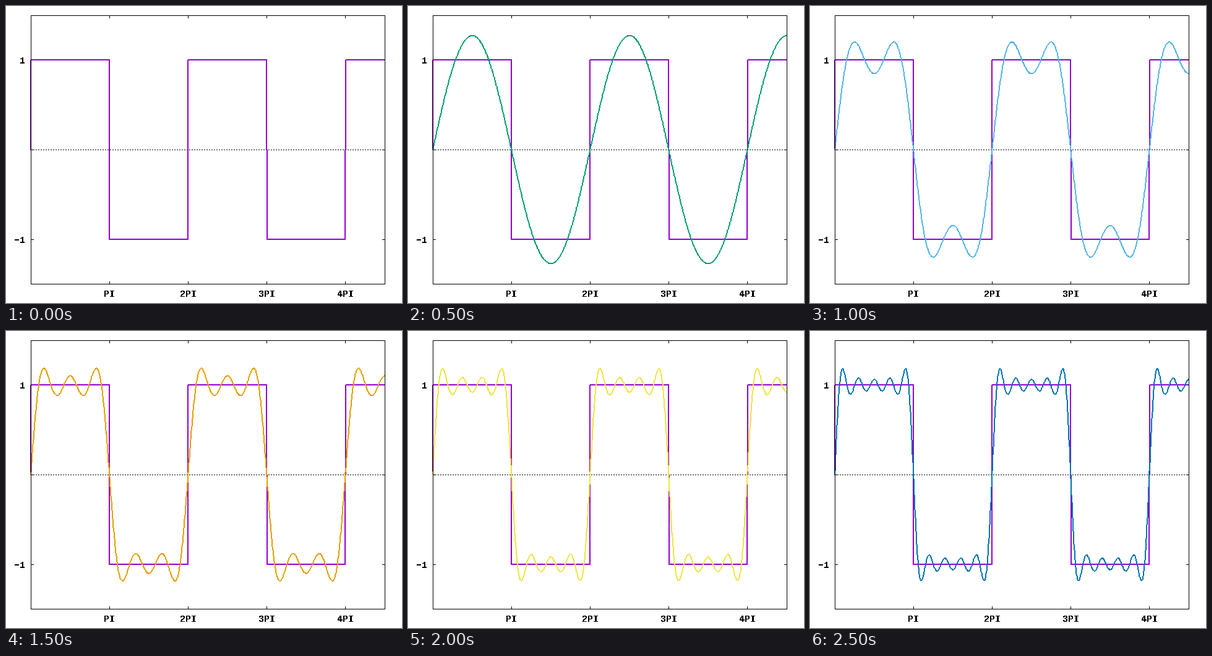
These frames come from a looping animation (640x480 px, 3 s). A matplotlib script:

```python
import numpy as np
import matplotlib.pyplot as plt
from matplotlib.animation import FuncAnimation
from matplotlib.colors import to_rgb

DPI = 80
WIDTH, HEIGHT = 640, 480
LEFT, RIGHT, TOP, BOTTOM = 40, 612, 15, 449
MID = (TOP + BOTTOM) // 2
X_UNIT = (RIGHT - LEFT) / (4.5 * np.pi)
Y_UNIT = (BOTTOM - TOP) / 3
TICK = 5
CHAR = 9  # text cell width
COLORS = ["#009e73", "#56b4e9", "#e69f00", "#f0e442", "#0072b2"]

plt.rcParams["text.antialiased"] = False

fig = plt.figure(figsize=(WIDTH / DPI, HEIGHT / DPI), dpi=DPI,
                 facecolor="white")
ax = fig.add_axes([0, 0, 1, 1])
ax.axis("off")


def segment(img, x0, y0, x1, y1, rgb):
    """Hard-edged line with a pen two pixels wide across its main axis."""
    dx, dy = abs(x1 - x0), abs(y1 - y0)
    count = max(dx, dy) + 1
    xs = np.rint(np.linspace(x0, x1, count)).astype(int)
    ys = np.rint(np.linspace(y0, y1, count)).astype(int)
    img[ys, xs] = rgb
    if dy > dx:
        img[ys, xs - 1] = rgb
    else:
        img[ys - 1, xs] = rgb


def polyline(img, x, y, color):
    x, y = np.rint(x).astype(int), np.rint(y).astype(int)
    for ends in zip(x, y, x[1:], y[1:]):
        segment(img, *ends, to_rgb(color))


def draw_border(img):
    img[[TOP, BOTTOM], LEFT:RIGHT + 1] = 0
    img[TOP:BOTTOM + 1, [LEFT, RIGHT]] = 0


def label(x, y, text):
    ax.text(x, y, text, ha="left", va="baseline", color="black",
            family="Liberation Mono", weight="bold", size=15 * 72 / DPI)


# Dotted zero line, ticks and labels
base = np.ones((HEIGHT, WIDTH, 3))
cols = np.arange(LEFT, RIGHT + 1)
base[MID, cols[(cols - LEFT) % 4 < 2]] = 0

for n, text in enumerate(["PI", "2PI", "3PI", "4PI"], 1):
    x = round(LEFT + n * np.pi * X_UNIT)
    base[TOP:TOP + TICK, x] = 0
    base[BOTTOM - TICK + 1:BOTTOM + 1, x] = 0
    label(x - len(text) * CHAR // 2, 470, text)

for value, text in [(1, "1"), (0, ""), (-1, "\u22121")]:
    y = round(MID - value * Y_UNIT)
    base[y, LEFT:LEFT + TICK] = 0
    base[y, RIGHT - TICK + 1:RIGHT + 1] = 0
    label(31 - len(text) * CHAR, y + 6, text)

# Square wave
HIGH, LOW = MID - Y_UNIT, MID + Y_UNIT
polyline(base,
         [40, 40, 167, 167, 294, 294, 421, 422, 548, 549, RIGHT],
         [MID, HIGH, HIGH, LOW, LOW, HIGH, HIGH, LOW, LOW, HIGH, HIGH],
         "#9400d3")

stage = ax.imshow(base, extent=(0, WIDTH, HEIGHT, 0), aspect="auto",
                  interpolation="nearest")
ax.set_xlim(0, WIDTH)
ax.set_ylim(HEIGHT, 0)
t = np.linspace(0, 4.5 * np.pi, 1000)


def draw(terms):
    """Show the square wave with a partial sum of its Fourier series."""
    img = base.copy()
    if terms:
        odd = range(1, 2 * terms, 2)
        total = 4 / np.pi * sum(np.sin(k * t) / k for k in odd)
        polyline(img, LEFT + t * X_UNIT, MID - total * Y_UNIT,
                 COLORS[terms - 1])
    draw_border(img)
    stage.set_data(img)
    return [stage]


anim = FuncAnimation(fig, draw, frames=6, interval=500, repeat=True,
                     repeat_delay=0, blit=False)
plt.show()
```
